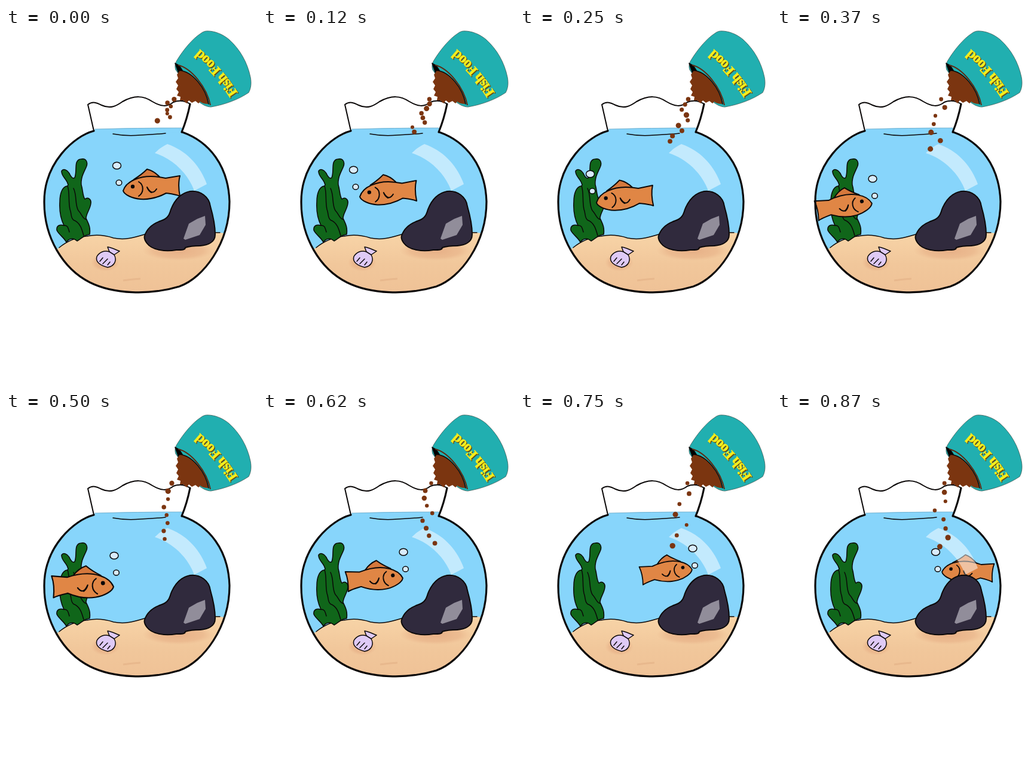
An HTML page that plays this animation: 420x595 px, repeating every 1 s.

```html
<!DOCTYPE html>
<html lang="en">
<head>
<meta charset="utf-8">
<title>Fish bowl</title>
<style>
html, body { margin: 0; width: 100%; height: 100%; overflow: hidden; background: #fff; }
svg { display: block; width: 100vw; height: 100vh; }
.line, .shape { stroke: #0b0808; stroke-width: 2; stroke-linecap: round; stroke-linejoin: round; }
.line { fill: none; }
.thin { stroke-width: 1.5; }
.glass { stroke-width: 3.2; }
.label { font: bold 24px "Liberation Serif", "Noto Serif", serif; letter-spacing: -.6px; stroke-width: .7; }
</style>
</head>
<body>
<svg viewBox="0 0 420 595">
  <defs>
    <path id="bowl" d="M147 172C115 180 63 225 64 292C64 350 95 402 140 425C180 445 240 447 290 432C330 418 374 360 374 290C372 230 340 190 295 174"/>
    <clipPath id="inside"><use href="#bowl"/></clipPath>
    <linearGradient id="sand" x1="0" y1="0" x2="0" y2="1">
      <stop offset="0" stop-color="#f8d5a8"/>
      <stop offset=".5" stop-color="#f1c79b"/>
      <stop offset="1" stop-color="#efc196"/>
    </linearGradient>
    <radialGradient id="shade">
      <stop offset="0" stop-color="#df9f78" stop-opacity=".65"/>
      <stop offset=".7" stop-color="#e5ac83" stop-opacity=".5"/>
      <stop offset="1" stop-color="#eab58c" stop-opacity="0"/>
    </radialGradient>
    <path id="baseline" d="M388 108Q359 63 320 32"/>
  </defs>

  <!-- water and sand -->
  <use href="#bowl" fill="#87d5fb"/>
  <path fill="#87d5fb" d="M146 173L149 169Q220 166 295 167V175Z"/>
  <path d="M148 169Q220 167 294 167" fill="none" stroke="#6ba7c4" stroke-width=".8"/>
  <g clip-path="url(#inside)">
    <path fill="url(#sand)" d="M76 376L89 367C100 358 115 350 135 348C150 345 165 346 180 351C200 355 215 350 232 345C270 338 330 338 358 342L380 345V450H76Z"/>
    <ellipse cx="288" cy="372" rx="60" ry="17" fill="url(#shade)"/>
    <ellipse cx="166" cy="392" rx="24" ry="15" fill="url(#shade)"/>
    <path d="M196 422Q210 420 225 419" stroke="#e8b88d" stroke-width="3" fill="none"/>
    <path class="line thin" d="M89 367C100 358 115 350 135 348C150 345 165 346 180 351C200 355 215 350 232 345M349 342H358"/>
  </g>
  <path class="line thin" d="M179 177Q200 181 225 179Q250 178 267 176"/>

  <!-- plant -->
  <path class="shape thin" fill="#10661a" d="M126 219C134 217 138 225 134 233C130 242 125 250 126 262C129 272 128 280 132 286C137 282 143 286 142 293C141 303 134 310 134 318C137 325 142 332 140 345C132 345 126 352 119 356C112 350 105 352 101 358C97 350 88 345 85 338C84 330 90 328 97 330C92 320 89 305 90 290C90 277 94 265 103 264L104 262C102 252 92 248 93 239C96 234 102 237 106 243C108 248 112 253 115 250C118 243 116 232 118 225C120 220 123 219 126 219Z"/>
  <path class="line thin" d="M103 264C107 275 104 290 107 303C110 311 108 317 113 321C124 325 127 336 130 347M113 268C119 280 115 295 121 305C127 311 128 319 134 320M97 330C103 329 104 334 106 341"/>

  <!-- shell -->
  <path class="shape thin" fill="#dfcaf6" d="M152 382C156 375 164 371 173 374L170 366C178 367 184 371 190 373L181 379C186 388 182 398 170 400C158 397 149 391 152 382Z"/>
  <path class="line thin" d="M173 374L181 379M157 390L162 384M162 394L170 386M170 396L174 391"/>

  <g id="fish">
    <path class="shape" fill="#d5783c" d="M18-20Q31-28 40-37Q52-34 61-24Z"/>
    <path class="shape" fill="#e08645" d="M0-1C3-10 10-16 20-20C36-27 54-26 71-22L95-26C92-14 93-2 95 8C88 5 79 4 72 3C59 10 44 14 29 13C16 12 2 6 0-1Z"/>
    <path class="line" d="M26-16C35-11 35 2 26 8M40-7C45 2 50 5 56-4M40-7Q42-1 47 2"/>
    <circle cx="16" cy="-8" r="3.2" fill="#0b0808"/>
  </g>

  <path fill="#fff" fill-opacity=".5" d="M249 209C256 202 262 198 270 194C302 205 325 230 336 261L315 272C305 245 282 220 249 209Z"/>

  <!-- rock -->
  <path class="shape" fill="#302a3d" d="M232 347C236 335 245 327 260 322C272 318 274 310 276 303C282 288 292 276 308 273C325 271 340 282 342 298C346 312 350 328 350 345C350 358 338 363 325 364C312 364 306 365 300 367C300 371 295 371 285 371C268 374 245 372 236 360C232 355 231 350 232 347Z"/>
  <path fill="#918d9a" d="M333 314L334 329L324 346L300 354L297 352L306 327L320 319Z"/>

  <g id="bubbles" class="shape thin" fill="#d9ecfc">
    <ellipse rx="7" ry="5.8"/>
    <ellipse cx="3.5" cy="28.5" rx="4.8" ry="4.6"/>
  </g>

  <!-- glass -->
  <use href="#bowl" class="line glass"/>
  <path class="line" d="M147 172L137 128C145 122 152 125 160 129C175 136 185 130 195 123C215 112 230 113 245 123C260 132 270 132 280 124C290 120 300 122 308 127"/>
  <path class="line glass" d="M308 127Q303 152 294 174"/>

  <g id="food" fill="#7b3510"></g>

  <!-- can -->
  <path fill="#21afb0" stroke="#3d5a55" stroke-width=".8" d="M337 5C349 5 362 10 373 19C392 36 404 58 409 82C411 92 410 101 406 108C388 120 366 128 343 132C336 132 328 128 320 121L284 70C282 64 283 59 286 54C297 36 312 18 326 9C330 6 333 5 337 5Z"/>
  <path class="shape thin" d="M283 59L290 63L297 74L289 76Z"/>
  <path fill="none" stroke="#5d2a12" stroke-width="2" d="M288 62C310 67 336 99 342 129"/>
  <path fill="#7b3510" d="M291 71C312 73 334 100 339 127Q329 127 325 123L322 126L317 122L311 125L306 121L302 126L297 121L291 121L292 115L286 113L289 107L285 102L288 96L284 90L288 84L286 78Z"/>
  <path class="line thin" d="M291 71C312 73 334 100 339 127"/>
  <g class="label">
    <text fill="#6b4a12" stroke="#6b4a12" transform="translate(1.4 1.4)"><textPath href="#baseline">Fish Food</textPath></text>
    <text fill="#f6ee1c" stroke="#f6ee1c"><textPath href="#baseline">Fish Food</textPath></text>
  </g>
</svg>
<script>
const LOOP = 1000, STEPS = 8;

// key poses of each leg: step, nose x, nose y, size, tilt, bubble rise
const leftward = [
  [-1, 276, 268, .9, 6, 34],
  [0, 196, 273, 1, 0, 43],
  [2, 128, 293, 1, -2.4, 49]
];
const rightward = [
  [3, 159, 294, .98, 12.5, 42],
  [4, 180, 293, 1.07, 5, 53],
  [6, 288, 264, .9, 12, 36]
];

const [fish, bubbles, food] = ["fish", "bubbles", "food"].map(id => document.getElementById(id));
const mix = (a, b, k) => a + (b - a) * k;
const noise = n => {
  const v = Math.sin(n * 12.9898) * 43758.5453;
  return v - Math.floor(v);
};

function poseAt(keys, step) {
  const i = step < keys[1][0] ? 0 : 1;
  const [a, b] = [keys[i], keys[i + 1]];
  const k = (step - a[0]) / (b[0] - a[0]);
  return a.map((value, n) => mix(value, b[n], k)).slice(1);
}

function swim(step) {
  const right = step > 2 && step < 7;
  const [x, y, size, tilt, rise] = right
    ? poseAt(rightward, step)
    : poseAt(leftward, step === 7 ? -1 : step);
  const flip = right ? -1 : 1;
  fish.setAttribute("transform", `translate(${x} ${y}) scale(${flip * size} ${size}) rotate(${tilt})`);
  bubbles.setAttribute("transform", `translate(${x + (right ? 1 : -10.5)} ${y - rise})`);
}

// crumbs spread out as they sink, and the trail grows over the loop
function pour(step) {
  const count = 7 + step % 3;
  const reach = 36 + 70 * (1 - (1 - step / (STEPS - 1)) ** 2);
  food.replaceChildren();
  for (let i = 0; i < count; i++) {
    const depth = i / (count - 1);
    const seed = step * 20 + i + 1;
    const dot = document.createElementNS("http://www.w3.org/2000/svg", "circle");
    dot.setAttribute("cx", 278 - 10 * depth + (noise(seed) - .5) * (8 + 36 * depth));
    dot.setAttribute("cy", 119 + reach * depth);
    dot.setAttribute("r", 3 + 1.7 * noise(seed + .5));
    food.append(dot);
  }
}

let shown = -1;
function tick() {
  const time = performance.now() % LOOP;
  // steps last 120 and 130 ms in turn
  const step = Math.floor(time / 250) * 2 + (time % 250 >= 120 ? 1 : 0);
  if (step !== shown) {
    shown = step;
    swim(step);
    pour(step);
  }
  requestAnimationFrame(tick);
}
tick();
</script>
</body>
</html>
```
